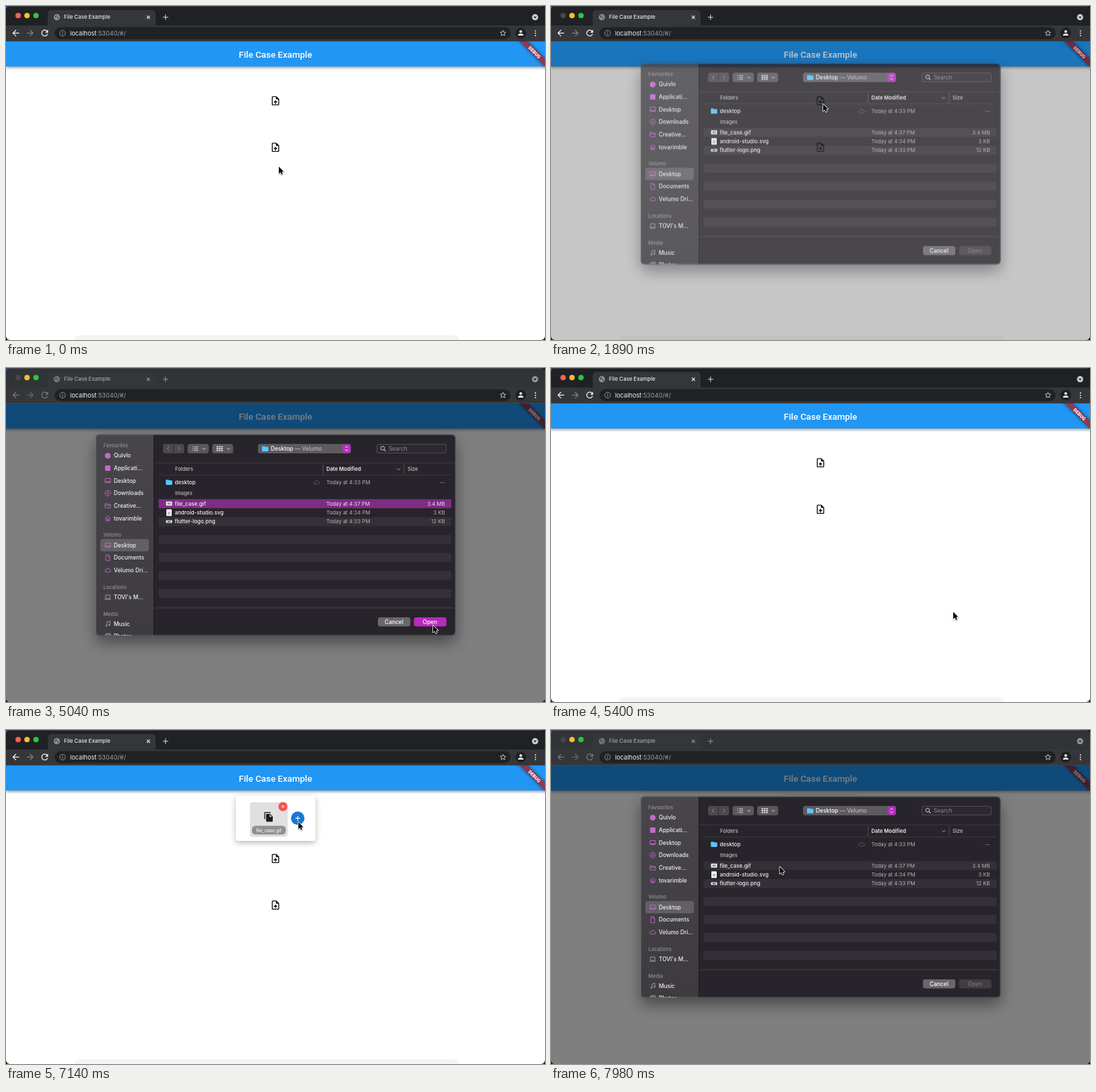
Animation of 800 by 497 pixels, one loop 8 s. Source, as an HTML page with a canvas:

```html
<!DOCTYPE html>
<html lang="en">
<head>
<meta charset="utf-8">
<title>File Case Example</title>
<style>
  html, body { margin: 0; width: 100%; height: 100%; overflow: hidden; background: #fff; }
  canvas { display: block; width: 800px; height: 497px; }
</style>
</head>
<body>
<canvas id="stage"></canvas>
<script>
const W = 800, H = 497, LOOP = 8000;
const UI = 'Inter, "Open Sans", sans-serif';
const ROBOTO = 'Roboto, "Noto Sans", sans-serif';
const dpr = window.devicePixelRatio || 1;

function setup(canvas) {
  canvas.width = W * dpr;
  canvas.height = H * dpr;
  const c = canvas.getContext('2d');
  c.scale(dpr, dpr);
  return c;
}
const screen2d = setup(document.getElementById('stage'));
const layer = document.createElement('canvas');
const layer2d = setup(layer);
let g = screen2d;

// Icons on a 24-unit grid
const ICON = {
  back: 'M20 11H7.83l5.59-5.59L12 4l-8 8 8 8 1.41-1.41L7.83 13H20v-2z',
  reload: 'M17.65 6.35C16.2 4.9 14.21 4 12 4c-4.42 0-7.99 3.58-7.99 8s3.57 8 7.99 8c3.73 0 6.84-2.55 7.73-6h-2.08c-.82 2.33-3.04 4-5.65 4-3.31 0-6-2.69-6-6s2.69-6 6-6c1.66 0 3.14.69 4.22 1.78L13 11h7V4l-2.35 2.35z',
  person: 'M12 12c2.21 0 4-1.79 4-4s-1.79-4-4-4-4 1.79-4 4 1.79 4 4 4zm0 2c-2.67 0-8 1.34-8 4v2h16v-2c0-2.66-5.33-4-8-4z',
  upload: 'M14 2H6c-1.1 0-1.99.9-1.99 2L4 20c0 1.1.89 2 1.99 2H18c1.1 0 2-.9 2-2V8l-6-6zm4 18H6V4h7v5h5v11zM8 15.01l1.41 1.41L11 14.84V19h2v-4.16l1.59 1.59L16 15.01 12.01 11 8 15.01z',
  copy: 'M16 1H4c-1.1 0-2 .9-2 2v14h2V3h12V1zm-1 4l6 6v10c0 1.1-.9 2-2 2H7.99C6.89 23 6 22.1 6 21V7c0-1.1.89-2 1.99-2h7zm-1 7h5.5L14 6.5V12z',
  blob: 'M4 9l5-5 5 1-2 5-4 2 1 4-3-1zM14 12l6-1-2 7-4 2z',
  star: 'M12 3l2.7 6 6.3.6-4.8 4.3 1.5 6.4L12 17l-5.700 3.300 1.500-6.400L3 9.600l6.300-.6z',
  desktop: 'M2 4H22V19H2zM2 15.500H22M7 17.500h10',
  down: 'M12 2a10 10 0 1 0 .01 0M12 6V16M8 12.500l4 4 4-4',
  folder: 'M2 4h7l2 3h11v13H2zM2 10h20',
  home: 'M2 12l10-9 10 9M5 10v11h14V10M10 21v-7h4v7',
  doc: 'M5 1h9l5 6v16H5zM14 1v6h5',
  cloud: 'M7 19H18a4.500 4.500 0 0 0 .5-9A6.500 6.500 0 0 0 6 10a4.500 4.500 0 0 0 1 9z',
  laptop: 'M4 4h16v13H4zM0 20h24',
  music: 'M9 19V5l11-3v14M9 19a2.500 2.500 0 1 1-5 0a2.500 2.500 0 1 1 5 0M20 16a2.500 2.500 0 1 1-5 0a2.500 2.500 0 1 1 5 0',
  photo: 'M2 6h16v13H2zM6 6V2h16v13h-4'
};
const paths = {};
for (const k in ICON) paths[k] = new Path2D(ICON[k]);

function icon(name, x, y, scale, color, line) {
  g.save();
  g.translate(x - 12 * scale, y - 12 * scale);
  g.scale(scale, scale);
  if (line) {
    g.lineWidth = line;
    g.lineJoin = 'round';
    g.strokeStyle = color;
    g.stroke(paths[name]);
  } else {
    g.fillStyle = color;
    g.fill(paths[name]);
  }
  g.restore();
}
function rect(x0, y0, x1, y1, color, r = 0) {
  g.beginPath();
  g.roundRect(x0, y0, x1 - x0, y1 - y0, r);
  g.fillStyle = color;
  g.fill();
}
function disc(x, y, r, color) {
  g.beginPath();
  g.arc(x, y, r, 0, 7);
  g.fillStyle = color;
  g.fill();
}
function ring(x, y, r, color, w) {
  g.beginPath();
  g.arc(x, y, r, 0, 7);
  g.strokeStyle = color;
  g.lineWidth = w;
  g.stroke();
}
function line(color, w, ...p) {
  g.beginPath();
  for (let i = 0; i < p.length; i += 2) g.lineTo(p[i], p[i + 1]);
  g.strokeStyle = color;
  g.lineWidth = w;
  g.stroke();
}
function text(s, x, y, size, color, weight = 400, align = 'left', family = UI) {
  g.font = `${weight} ${size}px ${family}`;
  g.textAlign = align;
  g.textBaseline = 'alphabetic';
  g.fillStyle = color;
  g.fillText(s, x, y + size * 0.355);
  return g.measureText(s).width;
}
function cross(x, y, r, color, w) {
  line(color, w, x - r, y - r, x + r, y + r);
  line(color, w, x - r, y + r, x + r, y - r);
}
function plus(x, y, r, color, w) {
  line(color, w, x - r, y, x + r, y);
  line(color, w, x, y - r, x, y + r);
}
function chevron(x, y, r, color, w = 1) {
  line(color, w, x - r, y - r / 2, x, y + r / 2, x + r, y - r / 2);
}

// Motion
const clamp = v => Math.max(0, Math.min(1, v));
const smooth = v => (v = clamp(v), v * v * (3 - 2 * v));
const ramp = (t, a, b) => smooth((t - a) / (b - a));
const sheetAt = t => ramp(t, 1770, 2030) - ramp(t, 5180, 5400) + ramp(t, 7200, 7460);

const TRACK = [
  [0, 405, 239], [250, 405, 239], [1350, 404, 146], [2150, 404, 146],
  [2950, 353, 201], [3400, 353, 201], [4700, 634, 383], [5220, 634, 383],
  [5760, 493, 307], [6840, 434, 137], [7400, 434, 137], [7980, 339.5, 203.5]
];
function cursorAt(t) {
  let i = 1;
  while (i < TRACK.length - 1 && t > TRACK[i][0]) i++;
  const [t0, x0, y0] = TRACK[i - 1], [t1, x1, y1] = TRACK[i];
  const k = ramp(t, t0, t1);
  return [x0 + (x1 - x0) * k, y0 + (y1 - y0) * k];
}

function browser(sheet) {
  const active = sheet < 0.6;
  const ink = active ? '#f1f3f4' : '#77797c';
  rect(0, 0, W, 52.5, active ? '#202124' : '#313437');
  rect(0, 0, W, 0.8, '#55575a');
  rect(62, 6, 222, 32, '#35363a', [5, 5, 0, 0]);
  rect(0, 29, W, 52.5, '#35363a');
  disc(18, 14.3, 4, sheet > 0 ? '#47484b' : '#fe5f57');
  disc(31.2, 14.3, 4, '#febc2e');
  disc(44.5, 14.3, 4, '#28c840');
  disc(75.5, 16.7, 4.6, active ? '#8f9397' : '#75787b');
  icon('blob', 75.5, 16.7, 0.38, '#4b4d51');
  text('File Case Example', 86, 16.5, 7.9, active ? '#e8eaed' : '#a2a5a9', 500);
  cross(211.3, 16.7, 2.3, active ? '#e8eaed' : '#909397', 1.1);
  plus(236.8, 16.7, 4, active ? '#d5d7da' : '#909397', 1.1);
  disc(785.3, 16.7, 4.6, active ? '#c9cccf' : '#929598');
  g.beginPath();
  g.moveTo(783, 15.7); g.lineTo(787.6, 15.7); g.lineTo(785.3, 18.4);
  g.fillStyle = '#202124';
  g.fill();

  icon('back', 14.5, 40.3, 0.62, ink);
  icon('back', 36, 40.3, -0.62, active ? '#7e8083' : '#66686b');
  icon('reload', 57.5, 40.3, 0.62, ink);
  rect(72, 31.5, 749, 49.5, '#202124', 9);
  ring(84, 40.4, 4.2, '#9aa0a6', 0.9);
  rect(83.5, 39.7, 84.5, 42.6, '#9aa0a6');
  rect(83.5, 38, 84.5, 39, '#9aa0a6');
  const w = text('localhost', 95, 40.3, 9.2, '#f1f3f4');
  text(':53040/#/', 95 + w, 40.3, 9.2, '#9aa0a6');
  icon('star', 737.6, 40.3, 0.46, '#d2d4d7', 2);
  disc(764, 40.3, 8, '#202124');
  icon('person', 764, 40.1, 0.5, '#f1f3f4');
  for (const dy of [-3.5, 0, 3.5]) disc(785.8, 40.4 + dy, 1, '#e8eaed');
}

function fileCard() {
  g.save();
  g.shadowColor = 'rgba(0,0,0,.28)';
  g.shadowBlur = 8 * dpr;
  g.shadowOffsetY = 3 * dpr;
  rect(341, 97.5, 459.5, 165, '#fff', 4);
  g.restore();
  rect(362, 107.5, 418, 159, '#e0e0e0', 4);
  icon('copy', 390, 129.3, 0.66, '#1c1c1c');
  rect(365, 142.5, 415.3, 155.5, '#8f918f', 5.5);
  text('file_case.gif', 390, 149, 7.1, '#fff', 400, 'center', ROBOTO);
  disc(411, 114, 6.7, '#f8524a');
  cross(411, 114, 1.9, '#fff', 1);
  disc(433, 131.3, 10, '#1976d2');
  plus(433, 131.3, 3.4, '#fff', 1.2);
}

function page(t, sheet) {
  const picked = t >= 5450;
  rect(0, 52, W, H, '#fff');
  g.save();
  g.globalAlpha = 1 - sheet;
  rect(100, 490, 674, 510, '#f4f4f4', 16);
  g.restore();
  if (picked) fileCard();
  const shift = picked ? 50.3 : 0;
  for (const y of [141, 210.2]) icon('upload', 400, y + shift, 0.68, '#111');

  g.save();
  g.shadowColor = 'rgba(0,0,0,.4)';
  g.shadowBlur = 4 * dpr;
  g.shadowOffsetY = 1.5 * dpr;
  rect(0, 52.5, W, 90, '#2196f3');
  g.restore();
  text('File Case Example', 400, 72, 13.3, '#fff', 500, 'center', ROBOTO);

  g.save();
  g.beginPath();
  g.rect(700, 52.5, 100, 60);
  g.clip();
  g.translate(784.5, 68.8);
  g.rotate(Math.PI / 4);
  g.shadowColor = 'rgba(0,0,0,.5)';
  g.shadowBlur = 4 * dpr;
  rect(-40, -4.2, 40, 4.3, '#8a3a55');
  g.shadowColor = 'transparent';
  text('DEBUG', 0, 0.1, 7, '#fff', 900, 'center', ROBOTO);
  g.restore();
  rect(0, 52.5, W, H, `rgba(0,0,0,${sheet * 0.5})`);
}

const PINK = '#c569c9', GREY = '#a5a3a8';
const HEADINGS = [['Favourites', 115.3], ['Velumo', 248.5], ['Locations', 326], ['Media', 366]];
const PLACES = [
  ['Quivlo', 130.5, 'disc'], ['Applicati...', 149, 'box'], ['Desktop', 167.7, 'desktop'],
  ['Downloads', 186.3, 'down'], ['Creative...', 205, 'folder'], ['tovarimble', 223.6, 'home'],
  ['Desktop', 263.7, 'desktop'], ['Documents', 282.3, 'doc'], ['Velumo Dri...', 300.8, 'cloud'],
  ["TOVI's M...", 341, 'laptop'], ['Music', 380.8, 'music'], ['Photos', 399.2, 'photo']
];
const FILES = [
  ['file_case.gif', '4:37', '3.4 MB', 201.8],
  ['android-studio.svg', '4:34', '3 KB', 215.2],
  ['flutter-logo.png', '4:33', '12 KB', 228.6]
];

function folder(x, y) {
  rect(x - 4.7, y - 4, x, y, '#3aa9e0', 1);
  rect(x - 4.7, y - 2.8, x + 4.7, y + 4, '#5ac8fa', 1);
}

function sidebar() {
  const shade = g.createLinearGradient(0, 99, 0, 398);
  shade.addColorStop(0, '#48464b');
  shade.addColorStop(1, '#3d3b40');
  rect(133.5, 99, 219, 398, shade);
  rect(140, 254.5, 212, 272.8, '#626066', 3.5);
  for (const [s, y] of HEADINGS) text(s, 144.5, y, 7.4, '#929095', 500);
  for (const [s, y, kind] of PLACES) {
    const color = y > 340 ? GREY : PINK;
    if (kind === 'disc') disc(151, y, 4.3, color);
    else if (kind === 'box') rect(147, y - 4, 155, y + 4, color, 1);
    else icon(kind, 151, y, 0.4, color, 2.2);
    text(s, 160, y, 8.3, '#f0eff1', 500);
  }
}

function toolbar() {
  const dim = '#8d8a90', lit = '#d8d6da';
  rect(233, 113, 248.3, 127, '#4b484e', [3.5, 0, 0, 3.5]);
  rect(249, 113, 264.300, 127, '#4b484e', [0, 3.5, 3.5, 0]);
  line(dim, 1, 242, 117, 239.300, 120, 242, 123);
  line(dim, 1, 255.500, 117, 258.200, 120, 255.500, 123);
  rect(269.5, 113, 301, 127, '#59565c', 3.5);
  rect(306, 113, 337.2, 127, '#59565c', 3.5);
  for (const dy of [-2.8, 0, 2.8]) {
    rect(276.5, 119.5 + dy, 277.7, 120.5 + dy, lit);
    rect(279, 119.5 + dy, 285, 120.5 + dy, lit);
    for (let i = 0; i < 3; i++) rect(312.5 + i * 3.4, 119 + dy, 315 + i * 3.4, 121 + dy, lit);
  }
  chevron(293.8, 120.2, 2.3, lit);
  chevron(330, 120.2, 2.3, lit);
  rect(374, 113, 512, 127, '#5d5a60', 3.5);
  folder(384.7, 120);
  const w = text('Desktop', 393, 120, 8.4, '#fff', 500);
  text(' — Velumo', 393 + w, 120, 8.4, '#c9c7cb');
  rect(499.5, 113.5, 511.500, 126.500, '#b92dbe', 3);
  chevron(505.500, 122.300, 2, '#fff');
  line('#fff', 1, 503.500, 118.500, 505.500, 116.500, 507.500, 118.500);
  rect(550, 113, 654, 127, '#5a575d', 3.5);
  rect(550.7, 113.7, 653.300, 126.300, '#2d2930', 3);
  ring(559, 119.3, 2.8, '#d0ced2', 1);
  line('#d0ced2', 1.1, 561, 121.300, 563.500, 124);
  text('Search', 568, 120.2, 8.4, '#8f8c92');
}

function listing(selected) {
  const soft = '#b4b2b6', rule = '#444047';
  rect(219.5, 140.7, 667, 141.500, rule);
  rect(226.5, 158.800, 661, 159.500, rule);
  text('Folders', 251, 150.4, 7.6, '#c2c0c4', 500);
  text('Date Modified', 475.5, 150.4, 7.6, '#f2f1f3', 600);
  text('Size', 596, 150.4, 7.6, '#c2c0c4', 500);
  chevron(582.8, 150.6, 2.4, '#aaa8ac');
  for (const x of [470.5, 591]) rect(x - 0.4, 143, x + 0.4, 158, '#5a575d');

  folder(242, 170);
  text('desktop', 250.5, 170, 8, '#f0eff1', 500);
  icon('cloud', 461, 170, 0.4, '#625f65', 2);
  text('Today at 4:33 PM', 475.5, 170, 7.8, soft);
  text('--', 651.5, 170, 7.8, soft, 400, 'right');
  text('Images', 251, 186.3, 7.4, '#bdbbbf', 500);

  for (let i = 0; i < 6; i++) {
    const y = 195.2 + i * 26.7;
    rect(226.5, y, 661, y + 13.3, '#343038', 1.5);
  }
  rect(226.5, 355.4, 661, 357, '#343038');
  if (selected) rect(226.5, 195.2, 661, 208.5, '#7f2c86', 1);
  FILES.forEach(([name, time, size, y], i) => {
    const color = selected && !i ? '#efdff0' : soft;
    if (i === 1) {
      rect(238, y - 5, 246, y + 5, '#f0f0f0', 1);
      rect(240, y - 1, 244, y + 2.5, '#b9b9bd');
    } else {
      const h = i ? 2 : 3;
      rect(237.5, y - h, 246.500, y + h, '#f2f2f2', 0.8);
      rect(239.500, y - h / 2, 244.500, y + h / 2, i ? '#59575c' : '#8a98a8');
    }
    text(name, 250.5, y, 8, '#f0eff1', 500);
    text(`Today at ${time} PM`, 475.5, y, 7.8, color);
    text(size, 651.5, y, 7.8, color, 400, 'right');
  });
  rect(219.5, 356.800, 667, 357.600, rule);
  rect(552, 371, 600.2, 384.6, '#69666c', 3.5);
  text('Cancel', 576, 377.8, 8.4, '#fff', 500, 'center');
  rect(605.5, 371, 653.700, 384.6, selected ? '#b92bbe' : '#403d43', 3.5);
  text('Open', 629.3, 377.8, 8.4, selected ? '#fff' : '#77747a', 500, 'center');
}

function dialog(sheet, selected) {
  g = layer2d;
  g.clearRect(0, 0, W, H);
  g.save();
  g.shadowColor = 'rgba(0,0,0,.42)';
  g.shadowBlur = 22 * dpr;
  g.shadowOffsetY = 10 * dpr;
  rect(133, 98.7, 667.5, 398.5, '#28242b', 6);
  g.restore();
  g.save();
  g.beginPath();
  g.roundRect(133, 98.7, 534.5, 299.8, 6);
  g.clip();
  sidebar();
  rect(219, 99, 219.800, 398, '#17141a');
  toolbar();
  listing(selected);
  g.restore();
  g.beginPath();
  g.roundRect(133.5, 99.2, 533.5, 298.8, 6);
  g.lineWidth = 0.9;
  g.strokeStyle = '#6b696e';
  g.stroke();

  g = screen2d;
  g.save();
  g.globalAlpha = Math.min(1, sheet * 1.75);
  g.drawImage(layer, 0, -25 * (1 - sheet), W, H);
  g.restore();
}

const ARROW = new Path2D('M0 0V10.400L2.400 8.200 4 11.800 5.700 11 4.200 7.500H7.300Z');
function pointer(t) {
  g.save();
  g.translate(...cursorAt(t));
  g.lineJoin = 'round';
  g.lineWidth = 1.6;
  g.strokeStyle = '#fff';
  g.shadowColor = 'rgba(0,0,0,.35)';
  g.shadowBlur = 2 * dpr;
  g.shadowOffsetY = dpr;
  g.stroke(ARROW);
  g.shadowColor = 'transparent';
  g.fillStyle = '#000';
  g.fill(ARROW);
  g.restore();
}

function draw(t) {
  const sheet = sheetAt(t);
  rect(0, 0, W, H, '#2b1018');
  rect(0, 0, 20, 20, '#2c5687');
  g.save();
  g.beginPath();
  g.roundRect(0, 0, W, H, 6);
  g.clip();
  page(t, sheet);
  browser(sheet);
  g.restore();
  if (sheet > 0) dialog(sheet, t >= 3050 && t < 5450);
  pointer(t);
}

const start = performance.now();
function tick() {
  draw((performance.now() - start) % LOOP);
  requestAnimationFrame(tick);
}
tick();
</script>
</body>
</html>
```
